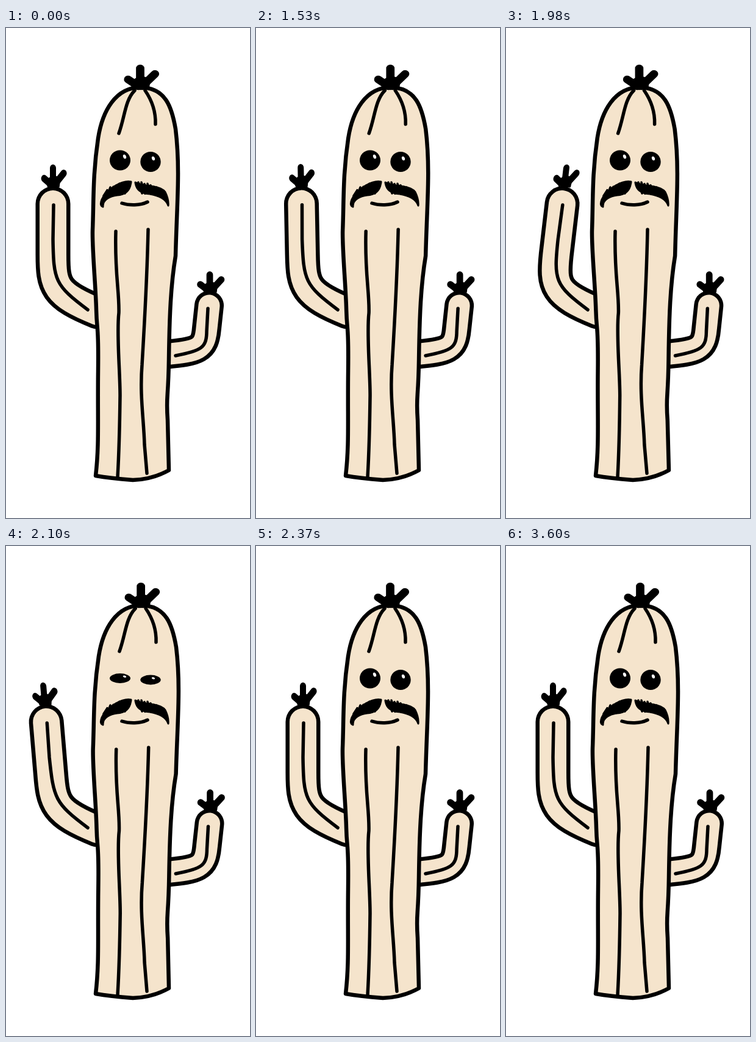
Animation, 400 px wide and 800 px high, one loop 4350 ms. Source, as an HTML page:

```html
<!DOCTYPE html>
<html lang="en">
<head>
<meta charset="utf-8">
<title>Waving cactus</title>
<style>
  html, body { margin: 0; width: 100%; height: 100%; overflow: hidden; background: #fff; }
  svg { display: block; width: 100%; height: 100%; }
  path { fill: none; stroke: #000; stroke-width: 5.5; stroke-linecap: round; stroke-linejoin: round; }
  .body { fill: #f5e4cc; stroke-width: 6.5; }
  .rim { stroke-width: 57; }
  .tube { stroke: #f5e4cc; stroke-width: 44; }
  .small .rim { stroke-width: 48; }
  .small .tube { stroke-width: 35; }
  .leaf { stroke-width: 12.5; }
  .solid { fill: #000; stroke-width: 3; }
  .hair { stroke-width: 3.5; }
  .glint { fill: #fff; }
</style>
</head>
<body>
<svg viewBox="0 0 400 800" xmlns="http://www.w3.org/2000/svg">
  <defs>
    <g id="plume">
      <path class="leaf" d="M-3 -3L-18 -14M0 -3V-32M3 -3L22 -23"/>
      <path class="solid" d="M-13 -10L0 -19L14 -14L12 0L-10 0Z"/>
    </g>
    <path id="bough" d="M333 453L329 490C326 525 315 528 260 534"/>
  </defs>

  <path class="rim" data-arm="tube"/>
  <path class="tube" data-arm="tube"/>
  <path data-arm="line"/>
  <g id="tuft"><use href="#plume" transform="translate(77 259) scale(.8 .95)"/></g>

  <g id="trunk">
    <g class="small">
      <path class="rim" d="M333 453L329 490C326 525 315 528 260 533"/>
      <path class="tube" d="M333 453L329 490C326 525 315 528 260 533"/>
      <path d="M331 458L329 495C329 522 320 527 278 535"/>
    </g>
    <use href="#plume" transform="translate(334 431) scale(.86 .88)"/>
    <path class="body" d="M147 731C153 680 150 640 151 560S149 500 148 460S141 360 142 330
      C144 280 142 240 151 180C158 135 180 97 220 97C262 97 272 130 278 165
      C286 230 280 290 278 372C270 420 268 470 267 540S262 600 265 640L267 722
      Q240 737 208 738Q170 735 147 731Z"/>
    <path d="M211 102C195 118 195 145 185 172M228 102Q246 128 245 157"/>
    <path d="M180 332C178 400 186 430 185 465C181 500 187 560 187 600Q186 680 183 733"/>
    <path d="M233 329C231 420 227 480 223 550C219 600 226 640 227 680L231 727"/>
    <use href="#plume" transform="translate(220 98) scale(1.1 1)"/>
  </g>

  <g class="eye" data-y="216">
    <ellipse cx="187" cy="216" rx="17" ry="16.5"/>
    <ellipse class="glint" cx="194.5" cy="210" rx="2.4" ry="3.6" transform="rotate(-22 194.5 210)"/>
  </g>
  <g class="eye" data-y="218.5">
    <ellipse cx="237" cy="218.5" rx="16.7" ry="16.5"/>
    <ellipse class="glint" cx="241.5" cy="213" rx="2.4" ry="3.4" transform="rotate(-22 241.5 213)"/>
  </g>
  <path class="solid" d="M205 251C190 248 164 264 157 280Q153 290 159 292C158 280 172 274 182 273Q203 272 205 251Z"/>
  <path class="solid" d="M212 252C228 260 252 256 261 268Q267 280 266 290C262 278 250 274 236 271Q214 270 212 252Z"/>
  <path class="hair" id="hair"/>
  <path d="M190 286C202 290 220 290 232 284"/>
</svg>
<script>
const LOOP = 4350, STEP = 30, ELBOW = 415, FLOOR = 735;

// Arm tip offset: time, dx, dy
const SWING = [[1500, 0, 0], [1740, -27, -4], [1980, 20, 0], [2175, -36, 0], [2370, 0, 0]];
const BLINKS = [0, 2040, 3450];

const $ = s => document.querySelector(s);
const $$ = s => [...document.querySelectorAll(s)];
const armPaths = $$('[data-arm]'), eyes = $$('.eye');

// Moustache bristles, combed outwards and shorter towards the ends
let hairs = '';
for (const side of [-1, 1])
  for (let i = 0; i < 8; i++) {
    const x = 209 + side * (11 + i * 5), y = 261 + i * i * .17;
    const len = 9 - i * .5 + Math.sin(i * 2.4);
    hairs += `M${x - side * 3} ${y - len}L${x + side * 3} ${y + len}`;
  }
$('#hair').setAttribute('d', hairs);

function swingAt(t) {
  const i = SWING.findIndex(k => k[0] > t);
  if (i < 1) return [0, 0];
  const a = SWING[i - 1], b = SWING[i], p = (t - a[0]) / (b[0] - a[0]);
  return [1, 2].map(k => a[k] + (b[k] - a[k]) * p);
}

// Eyes shut in 90 ms and open again in 60 ms
function lidAt(t) {
  const p = Math.min(...BLINKS.map(b => t < b ? 150 : Math.min(150, t - b)));
  return Math.max(.06, p < 90 ? 1 - (p / 90) ** 1.6 : (p - 90) / 60);
}

// Everything above a fixed height slants in proportion to its distance from it
const slant = (kx, ky, base) => `matrix(1 ${-ky} ${-kx} ${1 - ky} ${kx * base} ${ky * base})`
  .replace(/^matrix\(1 \S+/, 'matrix(1 0');

function draw(t) {
  const [dx, dy] = swingAt(t), lid = lidAt(t);
  const kx = dx / 170, ky = dy / 170;
  const at = (x, y) => `${x + kx * (ELBOW - y)} ${y + ky * (ELBOW - y)}`;
  const shapes = {
    tube: `M${at(77, 287)}L${at(77, 370)}C77 420 80 435 150 463`,
    line: `M${at(78, 289)}L${at(77, 345)}C78 412 80 420 134 460`,
  };
  for (const p of armPaths) p.setAttribute('d', shapes[p.dataset.arm]);
  $('#tuft').setAttribute('transform', slant(kx, ky, ELBOW));
  $('#trunk').setAttribute('transform', slant(-dx * .00012, 0, FLOOR));
  for (const eye of eyes) {
    const y = eye.dataset.y;
    eye.setAttribute('transform', `translate(0 ${y}) scale(1 ${lid}) translate(0 ${-y})`);
  }
}

const begin = performance.now();
let last = 0;
function tick() {
  const t = Math.floor((performance.now() - begin) % LOOP / STEP) * STEP;
  if (t !== last) draw(last = t);
  requestAnimationFrame(tick);
}
draw(0);
requestAnimationFrame(tick);
</script>
</body>
</html>
```
